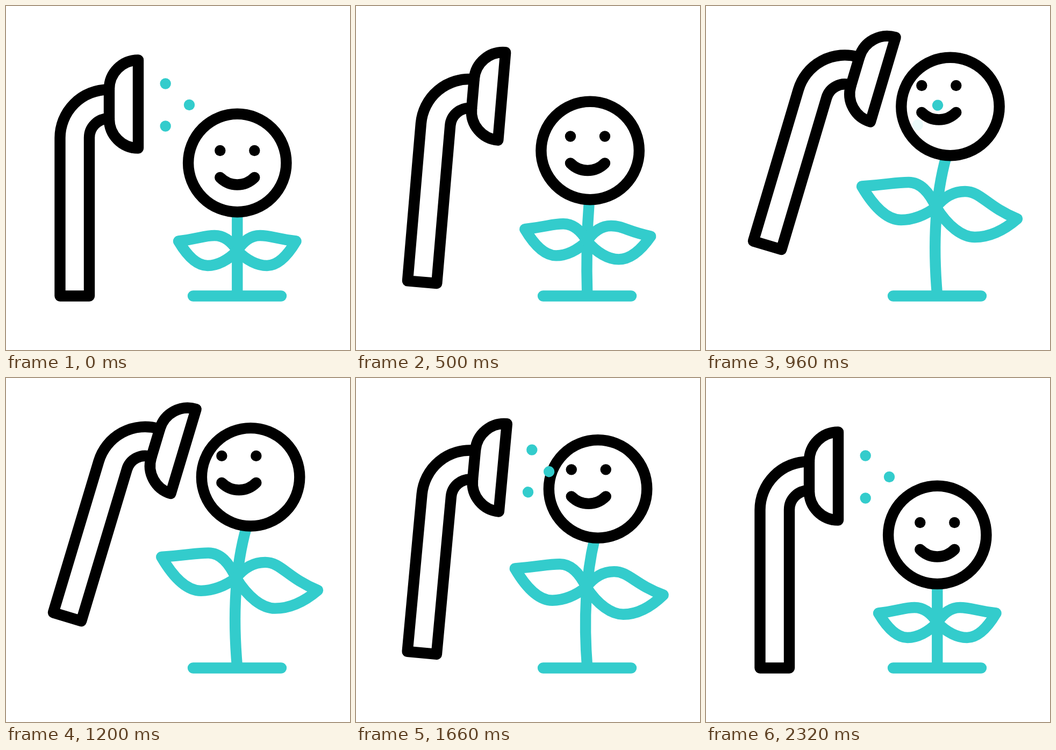
An HTML page with a canvas for the animation above (2.4 s loop, 640 by 640 pixels).

```html
<!DOCTYPE html>
<html lang="en">
<head>
<meta charset="utf-8">
<title>Watering a flower</title>
<style>
  html, body { margin: 0; width: 100%; height: 100%; overflow: hidden; background: #fff; }
  canvas { display: block; width: 640px; height: 640px; }
</style>
</head>
<body>
<canvas id="stage" width="640" height="640"></canvas>
<script>
const ctx = document.getElementById('stage').getContext('2d');
const LOOP = 2400, STEP = 20;
const TEAL = '#33cccc', BLACK = '#000', LINE = 20.4;
const AXIS = 430.3, GROUND = 539.5;

const mix = (a, b, u) => a + (b - a) * u;
const clamp = v => Math.min(1, Math.max(0, v));
const point = (x, y) => ({ x, y });
const mixPoint = (a, b, u) => point(mix(a.x, b.x, u), mix(a.y, b.y, u));
const mirror = p => point(2 * AXIS - p.x, p.y);

// Each leaf is four key points; the rest pose is symmetric about the stem.
const restLeaf = {
  root: point(AXIS, 455), hump: point(388, 427), tip: point(321, 437.5), belly: point(375, 483)
};
const leftLeaf = {
  root: point(428, 374), hump: point(377, 328), tip: point(290, 335.5), belly: point(363, 398)
};
const rightLeaf = {
  root: point(428, 374), hump: point(482, 345), tip: point(579, 396), belly: point(500, 430)
};

// Symmetric ease in-out: cubic-bezier(k, 0, 1 - k, 1).
function ease(x, k = 0.79) {
  x = clamp(x);
  let lo = 0, hi = 1;
  for (let i = 0; i < 24; i++) {
    const s = (lo + hi) / 2, r = 1 - s;
    if (3 * r * r * s * k + 3 * r * s * s * (1 - k) + s * s * s < x) lo = s; else hi = s;
  }
  return lo * lo * (3 - 2 * lo);
}

const flowerGrowth = t => (ease((t - 20) / 1160) - ease((t - 1185) / 1160)) / 0.975;
const showerTilt = t => ease(t / 1120) - ease((t - 1120) / 990);

function stroke(color, trace) {
  ctx.beginPath();
  trace();
  ctx.strokeStyle = color;
  ctx.stroke();
}

function dot(x, y, color) {
  ctx.fillStyle = color;
  ctx.beginPath();
  ctx.arc(x, y, 10.2, 0, 2 * Math.PI);
  ctx.fill();
}

// Cubic from a to b whose handles are fractions of the box between them.
function bend(a, b, x1, y1, x2, y2) {
  ctx.bezierCurveTo(mix(a.x, b.x, x1), mix(a.y, b.y, y1), mix(a.x, b.x, x2), mix(a.y, b.y, y2), b.x, b.y);
}

function drawLeaf(grown, u, place = p => p) {
  const [root, hump, tip, belly] = ['root', 'hump', 'tip', 'belly']
    .map(key => mixPoint(place(restLeaf[key]), grown[key], u));
  stroke(TEAL, () => {
    ctx.moveTo(root.x, root.y);
    bend(root, hump, 0.27, 0.64, 0.58, 1);
    bend(hump, tip, 0.3, 0, 0.42, 0.55);
    bend(tip, belly, 0.3, 0.6, 0.63, 1);
    bend(belly, root, 0.32, 0, 0.69, 0.35);
    ctx.closePath();
  });
}

function drawFlower(u) {
  stroke(TEAL, () => {
    ctx.moveTo(348, GROUND);
    ctx.lineTo(512, GROUND);
    ctx.moveTo(mix(AXIS, 447, u), mix(385, 280, u));
    ctx.quadraticCurveTo(mix(AXIS, 417, u), mix(462, 388, u), AXIS, GROUND);
  });
  drawLeaf(leftLeaf, u);
  drawLeaf(rightLeaf, u, mirror);

  stroke(BLACK, () => ctx.arc(mix(AXIS, 454.5, u), mix(292, 187, u), 91.2, 0, 2 * Math.PI));

  ctx.save();
  ctx.translate(AXIS + 3 * u, 269 - 121 * u);
  dot(-32, 0, BLACK);
  dot(32, 0, BLACK);
  stroke(BLACK, () => {
    ctx.moveTo(-32, 50);
    ctx.bezierCurveTo(-14, 68, 14, 68, 32, 50);
  });
  ctx.restore();
}

function placeShower(u) {
  ctx.translate(173.5 + 47.7 * u, 320 - 73 * u);
  ctx.rotate(16.8 * u * Math.PI / 180);
  ctx.translate(-173.5, -320);
}

function drawShower() {
  const left = 100.5, right = 155, neck = 192, face = 246, radius = face - neck;
  stroke(BLACK, () => {
    ctx.moveTo(neck, 155.5);
    ctx.arcTo(left, 155.5, left, GROUND, 90);
    ctx.lineTo(left, GROUND);
    ctx.lineTo(right, GROUND);
    ctx.arcTo(right, 209.5, neck, 209.5, 35.5);
    ctx.lineTo(neck, 209.5);
  });
  stroke(BLACK, () => {
    ctx.moveTo(face, 100.5);
    ctx.arcTo(neck, 100.5, neck, 182, radius);
    ctx.arcTo(neck, 264.5, face, 264.5, radius);
    ctx.closePath();
  });
}

// Drops leave the nozzle twice per loop: once flying past, once stopping midway.
function drawDrop(row, t) {
  const middle = row === 0;
  const flight = middle ? 335 : 279 + 4 * row;
  const from = point(256, 165 + 26.4 * row);
  const mid = point(middle ? 341 : 296.7, 184 + 39.5 * row);
  const to = point(mid.x + 36, mid.y + 22);
  const fadeIn = age => clamp(age / 72);
  const fadeOut = age => clamp((flight - age) / 30);
  const travel = age => clamp(age / flight);

  let pos, alpha;
  if (t < 680) {
    pos = mixPoint(mid, to, travel(t) ** 2);
    alpha = fadeOut(t);
  } else if (t < 1360) {
    const age = t - 680;
    pos = mixPoint(from, to, travel(age));
    alpha = Math.min(fadeIn(age), fadeOut(age));
  } else {
    const age = t - 1360;
    pos = mixPoint(from, mid, travel(age));
    alpha = fadeIn(age);
  }
  ctx.globalAlpha = alpha;
  dot(pos.x, pos.y, TEAL);
  ctx.globalAlpha = 1;
}

function render(t) {
  ctx.fillStyle = '#fff';
  ctx.fillRect(0, 0, 640, 640);
  ctx.lineWidth = LINE;
  ctx.lineCap = ctx.lineJoin = 'round';
  drawFlower(flowerGrowth(t));
  ctx.save();
  placeShower(showerTilt(t));
  drawShower();
  for (let row = -1; row <= 1; row++) drawDrop(row, t);
  ctx.restore();
}

const start = performance.now();
function tick() {
  const t = Math.max(0, performance.now() - start) % LOOP;
  render(Math.floor(t / STEP) * STEP);
  requestAnimationFrame(tick);
}
tick();
</script>
</body>
</html>
```
